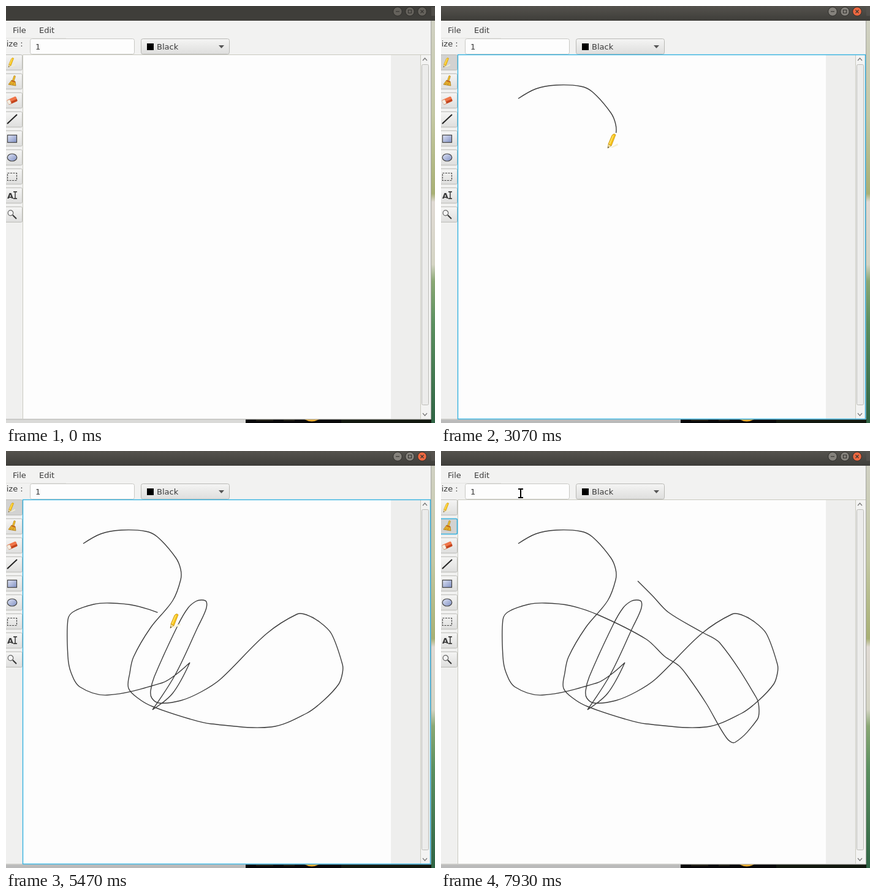
Recreate the animation shown at these times as an HTML page. Size 700x680 px, loop 8000 ms.

```html
<!DOCTYPE html>
<html lang="en">
<head>
<meta charset="utf-8">
<title>Paint window</title>
<style>
  html, body { margin: 0; width: 100%; height: 100%; overflow: hidden; background: #f0f0ef; }
  svg { display: block; width: 700px; height: 680px; }
  text { font: 13px "DejaVu Sans", sans-serif; fill: #3a3a3a; white-space: pre; }
</style>
</head>
<body>
<svg id="stage" viewBox="0 0 700 680" xmlns="http://www.w3.org/2000/svg">
  <defs>
    <linearGradient id="button" x2="0" y2="1"><stop stop-color="#f5f5f4"/><stop offset="1" stop-color="#dededd"/></linearGradient>
    <linearGradient id="titleOn" x2="0" y2="1"><stop stop-color="#55534e"/><stop offset="1" stop-color="#3e3d39"/></linearGradient>
    <linearGradient id="steel" x2="1" y2="1"><stop stop-color="#dfe4f4"/><stop offset="1" stop-color="#8090c4"/></linearGradient>
    <linearGradient id="desktop" x2="0" y2="1">
      <stop stop-color="#d2d2c8"/><stop offset=".26" stop-color="#c4c8a4"/><stop offset=".45" stop-color="#a8b074"/>
      <stop offset=".47" stop-color="#e0dad4"/><stop offset=".62" stop-color="#d4d4c4"/>
      <stop offset=".66" stop-color="#8aa874"/><stop offset=".76" stop-color="#5c9060"/><stop offset="1" stop-color="#2f6444"/>
    </linearGradient>
    <g id="pencil">
      <path d="M-2 11L10 4L11 7L2 11Z" fill="#f4f0d4"/>
      <path d="M-6 12L-5 5L0 8Z" fill="#f3dfa0" stroke="#b09040" stroke-width=".6"/>
      <path d="M-6 12L-5.600 9L-3.800 10.300Z" fill="#4a4220"/>
      <path d="M-5 5L1 -9Q4 -13 7 -10L0 8Z" fill="#f7c41a" stroke="#c8900c" stroke-width=".8"/>
      <path d="M-3 5L3 -9" stroke="#ffe36a" stroke-width="1.600"/>
    </g>
    <g id="brush">
      <path d="M2 -2L4 -8" stroke="#b8861c" stroke-width="3.400" stroke-linecap="round"/>
      <path d="M2 -2L4 -8" stroke="#f4c430" stroke-width="1.800" stroke-linecap="round"/>
      <path d="M-1 -2L5 0L6 7L-6 5Z" fill="#e8b02c" stroke="#a87a18" stroke-width=".8"/>
      <path d="M-1 -1L5 1" stroke="#c05a20" stroke-width="1.600"/>
      <path d="M-1 2L-3 5M2 2L1 6" stroke="#a87a18" stroke-width=".7"/>
    </g>
  </defs>

  <rect width="700" height="680" fill="#f0f0ef"/>
  <rect x="694" width="6" height="680" fill="url(#desktop)"/>
  <path d="M693.500 362V674" stroke="#141414"/>
  <rect id="ledge" y="675" width="391" height="5"/>
  <rect x="391" y="674" width="303" height="6" fill="#08080a"/>
  <rect x="547" y="674" width="147" height="6" fill="#12180f"/>
  <g fill="#1c1a12"><rect x="408" y="674" width="28" height="3"/><rect x="453" y="674" width="18" height="3"/></g>
  <path d="M487 674H511Q499 681 487 674Z" fill="#f0b030"/>

  <rect id="titlebar" width="700" height="24"/>
  <g id="windowButtons"></g>

  <rect y="24" width="693" height="55" fill="#f2f2f1"/>
  <path d="M0 52.500H98" stroke="#e4e4e2"/>
  <text x="11" y="44">File</text>
  <text x="54" y="44">Edit</text>
  <text x="-7.5" y="66">Size :</text>
  <rect x="39.500" y="53.500" width="170" height="25" rx="3" fill="#fdfdfd" stroke="#c8c8c4"/>
  <text x="48" y="71">1</text>
  <rect x="220.500" y="53.500" width="144" height="25" rx="3" fill="url(#button)" stroke="#b8b8b4"/>
  <rect x="230" y="61" width="11" height="11"/>
  <text x="246" y="71">Black</text>
  <path d="M347 64H356L351.500 69Z" fill="#555"/>

  <rect x="628" y="80" width="49" height="593" fill="#eeeeed"/>
  <rect x="28" y="80" width="600" height="593" fill="#fdfdfd"/>
  <rect x="677" y="80" width="16" height="593" fill="#f3f3f2"/>
  <rect x="678.500" y="95.500" width="11" height="555" rx="2" fill="#ececeb" stroke="#bcbcb8"/>
  <path d="M680 89L683.500 85L687 89M680 664L683.500 668L687 664" fill="none" stroke="#777" stroke-width="1.200"/>
  <path d="M27.500 673V79.500H693M676.500 80V673" fill="none" stroke="#cacac0"/>
  <path d="M0 674H693.500V24" fill="none" stroke="#a4a4a0"/>
  <g id="tools"></g>
  <rect id="canvasFocus" x="27.500" y="79.500" width="665" height="594" fill="none" stroke="#35b2e0" stroke-width="1.400"/>
  <path id="stroke" fill="none" stroke="#3c3c3c" stroke-width="1.400"/>

  <g id="cursor">
    <path id="arrow" d="M0 0V16L4 12.500L7 19L10 17.500L7 11.500H12Z" fill="#fff" stroke="#111" stroke-width="1.200"/>
    <use id="penCursor" href="#pencil" x="-4"/>
    <use id="brushCursor" href="#brush"/>
    <g id="beam" fill="none">
      <path d="M-4 -7H4M0 -7V7M-4 7H4" stroke="#fff" stroke-width="4"/>
      <path d="M-4 -7H4M0 -7V7M-4 7H4" stroke="#000" stroke-width="2"/>
    </g>
  </g>
</svg>
<script>
const $ = id => document.getElementById(id);
const LOOP = 8000, WINDOW_FOCUS = 1400, DRAW_START = 2530, DRAW_END = 6330, BRUSH_CLICK = 7230;
const LEAD = 35; // the pen runs slightly ahead of its line

const icons = [
  '<use href="#pencil" transform="translate(-2 0) scale(.66)"/>',
  '<use href="#brush"/>',
  '<g transform="rotate(-24)"><rect x="-8" y="-3.500" width="16" height="8" rx="1.500" fill="#c4441c"/><rect x="-8" y="-4" width="16" height="5" rx="1.500" fill="#f0764a"/><rect x="-8" y="-3" width="5" height="7" rx="1" fill="#f6efe4" stroke="#c8b8a0" stroke-width=".5"/></g>',
  '<path d="M-8 7L8 -8" stroke="#222" stroke-width="2"/>',
  '<rect x="-7.500" y="-5.500" width="15" height="12" fill="url(#steel)" stroke="#444" stroke-width="1.200"/>',
  '<ellipse rx="7.800" ry="6" fill="url(#steel)" stroke="#444" stroke-width="1.200"/>',
  '<rect x="-7.500" y="-5.500" width="15" height="12" fill="none" stroke="#444" stroke-width="1.200" stroke-dasharray="3 1.500"/>',
  '<text x="-8" y="5" style="font-weight:bold">A</text><path d="M2 -6H8M5 -6V5M2 5H8" fill="none" stroke="#222" stroke-width="1.300"/>',
  '<path d="M1 1L7 7" stroke="#333" stroke-width="2"/><circle cx="-2.500" cy="-2.500" r="4.300" fill="#f4f4f4" stroke="#666" stroke-width="1.200"/>'
];
$('tools').innerHTML = icons.map((icon, i) => {
  const y = 92 + 31 * i;
  return `<rect class="tool" x="-6.5" y="${y - 12.5}" width="33" height="25" rx="2"/><g transform="translate(10 ${y})">${icon}</g>`;
}).join('');
const tools = document.querySelectorAll('.tool');

const glyphs = ['M-3 0H3', 'M-2.500 -2.500H2.500V2.500H-2.500Z', 'M-2.500 -2.500L2.500 2.500M2.500 -2.500L-2.500 2.500'];
$('windowButtons').innerHTML = glyphs.map((d, i) =>
  `<g transform="translate(${639 + 20 * i} 9)"><circle class="knob" r="7.300" stroke="#2e2d2a"/><path d="${d}" fill="none" stroke="#373632" stroke-width="1.200"/></g>`
).join('') + '<rect x="694" y="2" width="6" height="14" fill="#5b5852" opacity=".6"/>';
const knobs = document.querySelectorAll('.knob');

const points = `126,151 155,135 188,129 228,131 247,140 277,174 285,193 285,210 272,244 236,288 208,336 202,362
  200,387 218,405 240,417 300,437 335,445 433,450 490,428 518,407 543,380 549,362 549,348 531,298 512,279 490,267
  475,266 425,298 350,372 318,393 285,407 250,411 238,403 236,391 242,368 281,283 297,256 310,245 320,243 327,246
  326,259 313,287 276,365 239,422 272,395 300,345 278,364 255,378 165,398 121,385 106,361 101,335 101,275 110,262
  143,250 170,248 210,252 256,267 335,307 365,335 388,350 403,368 433,412 466,468 480,475 516,438 519,422 515,403
  455,313 425,295 371,263 345,236 321,212`.trim().split(/\s+/).map(p => p.split(',').map(Number));
const corners = [43, 45];

// Unit tangent at a point; zero at ends and sharp turns.
function tangent(i) {
  const a = points[i - 1], b = points[i + 1];
  if (!a || !b || corners.includes(i)) return [0, 0];
  const size = Math.hypot(b[0] - a[0], b[1] - a[1]);
  return [(b[0] - a[0]) / size, (b[1] - a[1]) / size];
}

const stroke = $('stroke'), lengths = [0];
let d = 'M' + points[0];
for (let i = 1; i < points.length; i++) {
  const [p, q] = [points[i - 1], points[i]], [u, v] = [tangent(i - 1), tangent(i)];
  const h = Math.hypot(q[0] - p[0], q[1] - p[1]) / 3;
  d += `C${p[0] + u[0] * h},${p[1] + u[1] * h} ${q[0] - v[0] * h},${q[1] - v[1] * h} ${q}`;
  stroke.setAttribute('d', d);
  lengths.push(stroke.getTotalLength());
}

const smooth = k => k * k * (3 - 2 * k);
const linear = k => k;

// Rows are [time, ...values].
function sample(rows, t, ease) {
  const n = rows.findIndex(row => row[0] > t);
  if (n === 0) return rows[0].slice(1);
  if (n < 0) return rows[rows.length - 1].slice(1);
  const a = rows[n - 1], b = rows[n], k = ease((t - a[0]) / (b[0] - a[0]));
  return a.slice(1).map((value, i) => value + (b[i + 1] - value) * k);
}

function lengthAt(index) {
  const i = Math.min(Math.floor(index), points.length - 2);
  return lengths[i] + (lengths[i + 1] - lengths[i]) * (index - i);
}

// Time against position along the point list.
const drawing = [[DRAW_START, 0], [3670, 13], [4170, 18.7], [4770, 41.68], [4805, 42.7],
  [5000, 45], [5800, 64], [DRAW_END, 72]].map(([t, index]) => [t, lengthAt(index)]);
const moves = [[0, -40, 110], [650, -40, 110], [950, 4, 93], [1600, 4, 93], [2250, 126, 151], [DRAW_START, 126, 151],
  [DRAW_END, 321, 212], [6420, 321, 212], [7050, 8, 122], [7250, 8, 122], [7850, 130, 69]];

function cursorAt(t) {
  if (t < DRAW_START || t > DRAW_END) return sample(moves, t, smooth);
  const p = stroke.getPointAtLength(sample(drawing, t + LEAD, linear)[0]);
  return [p.x, p.y];
}

const show = (id, on) => { $(id).style.display = on ? '' : 'none'; };

function render(t) {
  const focused = t >= WINDOW_FOCUS;
  const selected = t >= BRUSH_CLICK ? 1 : focused ? 0 : -1;
  const canvasFocus = t >= DRAW_START && t < BRUSH_CLICK;

  $('titlebar').setAttribute('fill', focused ? 'url(#titleOn)' : '#3f3e3a');
  $('ledge').setAttribute('fill', focused ? '#bababa' : '#dadad8');
  knobs.forEach((knob, i) =>
    knob.setAttribute('fill', !focused ? '#65625c' : i === 2 ? '#ee6840' : '#85827c'));
  tools.forEach((tool, i) => {
    const on = i === selected;
    tool.setAttribute('fill', on ? '#d2d2d1' : 'url(#button)');
    tool.setAttribute('stroke', on && !canvasFocus ? '#35b2e0' : '#bcbcb8');
    tool.setAttribute('stroke-width', on && !canvasFocus ? 1.6 : 1);
  });
  show('canvasFocus', canvasFocus);

  const drawn = sample(drawing, t, linear)[0];
  show('stroke', drawn > 0);
  stroke.setAttribute('stroke-dasharray', drawn + ' 9999');

  const [x, y] = cursorAt(t);
  const onCanvas = x > 28 && y > 80 && selected >= 0;
  const onField = x > 39 && x < 210 && y > 53 && y < 79;
  $('cursor').setAttribute('transform', `translate(${Math.round(x)} ${Math.round(y)})`);
  show('penCursor', onCanvas && selected === 0);
  show('brushCursor', onCanvas && selected === 1);
  show('beam', onField);
  show('arrow', !onCanvas && !onField);
}

const start = performance.now();
function frame() {
  render((performance.now() - start) % LOOP);
  requestAnimationFrame(frame);
}
frame();
</script>
</body>
</html>
```
